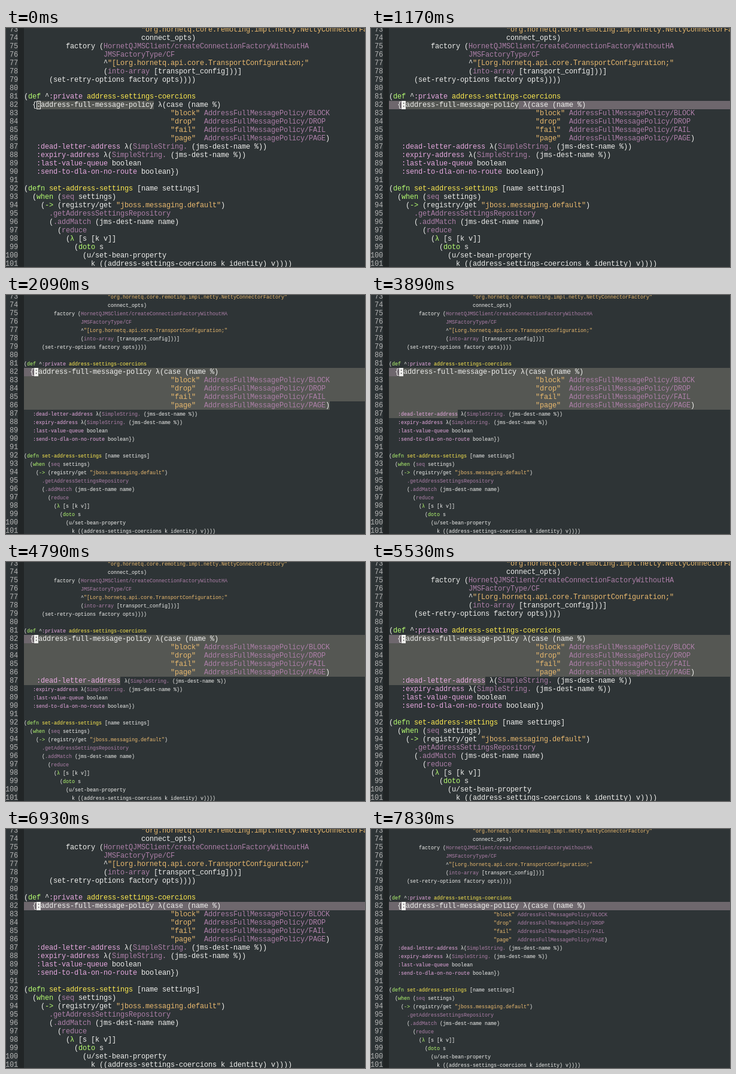
Recreate the animation shown at these times as an HTML page. Size 600 px wide and 400 px high, loop 8000 ms.

```html
<!DOCTYPE html>
<html lang="en">
<head>
<meta charset="utf-8">
<title>Expanding selection in a code editor</title>
<style>
html, body { margin: 0; width: 100%; height: 100%; overflow: hidden; background: #2e3436; }
#stage {
  position: relative; width: 600px; height: 400px; overflow: hidden;
  background: #2e3436; color: #eeeeec;
  font: 12px/14px "Liberation Mono", "Courier New", monospace;
  font-variant-ligatures: none;
}
#stage div { position: absolute; height: 14px; white-space: pre; }
#stage .fringe { left: 20px; top: 0; width: 10px; height: 400px; background: #212526; }
.num { right: 580px; color: #b3b3b3; }
.code { left: 30px; }
.num, .big, .cursor { letter-spacing: calc(7px - 1ch); }
.small { font-size: 8.5px; line-height: 0; letter-spacing: calc(5px - 1ch); }
.line { background: #6e676d; }
.region { background: #555753; }
.cursor { width: 7px; background: #eeeeec; }
#stage .hollow { box-sizing: border-box; background: none; border: 1px solid #eeeeec; }
.str { color: #e9b96e; }
.key { color: #e6a8df; }
.kw { color: #b4fa70; }
.fn { color: #fce94f; }
.sym { color: #ad7fa8; }
</style>
</head>
<body>
<div id="stage"></div>
<script>
const FIRST = 73, LEFT = 30, RIGHT = 600, LOOP = 8000;

// [indent, text] for each line
const lines = [
  [28, '"org.hornetq.core.remoting.impl.netty.NettyConnectorFactory"'],
  [28, 'connect_opts)'],
  [10, 'factory (HornetQJMSClient/createConnectionFactoryWithoutHA'],
  [19, 'JMSFactoryType/CF'],
  [19, '^"[Lorg.hornetq.api.core.TransportConfiguration;"'],
  [19, '(into-array [transport_config]))]'],
  [6, '(set-retry-options factory opts))))'],
  [0, ''],
  [0, '(def ^:private address-settings-coercions'],
  [2, '{:address-full-message-policy λ(case (name %)'],
  [35, '"block" AddressFullMessagePolicy/BLOCK'],
  [35, '"drop"  AddressFullMessagePolicy/DROP'],
  [35, '"fail"  AddressFullMessagePolicy/FAIL'],
  [35, '"page"  AddressFullMessagePolicy/PAGE)'],
  [3, ':dead-letter-address λ(SimpleString. (jms-dest-name %))'],
  [3, ':expiry-address λ(SimpleString. (jms-dest-name %))'],
  [3, ':last-value-queue boolean'],
  [3, ':send-to-dla-on-no-route boolean})'],
  [0, ''],
  [0, '(defn set-address-settings [name settings]'],
  [2, '(when (seq settings)'],
  [4, '(-> (registry/get "jboss.messaging.default")'],
  [6, '.getAddressSettingsRepository'],
  [6, '(.addMatch (jms-dest-name name)'],
  [8, '(reduce'],
  [10, '(λ [s [k v]]'],
  [12, '(doto s'],
  [14, '(u/set-bean-property'],
  [16, 'k ((address-settings-coercions k identity) v))))']
].map(([indent, text]) => ' '.repeat(indent) + text);

const syntax = new RegExp([
  '(?<str>"[^"]*")',
  '(?<key>:[a-z-]+)',
  '(?<fn>(?<=private |defn )[a-z-]+)',
  '(?<kw>\\b(?:defn?|when|doto)\\b|->|(?<=\\()λ(?= ))',
  '(?<sym>(?:HornetQJMSClient|JMSFactoryType|AddressFullMessagePolicy)/\\w+' +
    '|SimpleString\\.|\\.\\w+|into-array|\\bseq\\b|\\breduce\\b)'
].join('|'), 'g');

const escape = s => s.replace(/&/g, '&amp;').replace(/</g, '&lt;').replace(/>/g, '&gt;');

function paint(text) {
  let out = '', pos = 0;
  for (const m of text.matchAll(syntax)) {
    const kind = Object.keys(m.groups).find(k => m.groups[k]);
    out += escape(text.slice(pos, m.index)) + `<span class="${kind}">${escape(m[0])}</span>`;
    pos = m.index + m[0].length;
  }
  return out + escape(text.slice(pos));
}

// Lines whose two parts can differ in size
const splits = { 82: 2, 87: 24 };

// Which parts stay large, by zoom mode
const isBig = {
  all: () => true,
  line: n => n === 82,
  block: (n, part) => (n === 82 && part === 1) || (n > 82 && n < 87),
  grown: (n, part) => isBig.block(n, part) || (n === 87 && part === 0)
};

// Start time, zoom, region, line highlight, hollow cursor
const states = [
  [0, 'all', 'word', false, true],
  [520, 'all', '', true],
  [1170, 'all', 'word', true],
  [1360, 'all', 'block', true],
  [2090, 'block', 'block', true],
  [3890, 'block', 'grown', true],
  [4790, 'grown', 'grown', true],
  [5530, 'all', 'grown', true],
  [6790, 'all', 'word', false],
  [6930, 'all', '', true],
  [7830, 'line', '', true]
];

const top_ = n => 122 + (n - 82) * 14;

const bar = (kind, n, x0, x1) =>
  `<div class="${kind}" style="left:${x0}px;top:${top_(n)}px;width:${x1 - x0}px"></div>`;

function codeLine(text, n, zoom) {
  const at = splits[n] || 0;
  const parts = [text.slice(0, at), text.slice(at)].map((s, i) => {
    const size = isBig[zoom](n, i) ? 'big' : 'small';
    return s && `<span class="${size}">${n === 82 ? escape(s) : paint(s)}</span>`;
  });
  const y = `style="top:${top_(n)}px"`;
  return `<div class="num" ${y}>${n}</div><div class="code" ${y}>${parts.join('')}</div>`;
}

function selection(zoom, region, x) {
  if (!region) return '';
  if (region === 'word') return bar('region', 82, x, x + 28 * 7);
  const grown = region === 'grown';
  let out = bar('region', 82, x, RIGHT);
  for (let n = 83; n < 86; n++) out += bar('region', n, LEFT, RIGHT);
  out += bar('region', 86, LEFT, grown ? RIGHT : 541);
  const step = isBig[zoom](87, 0) ? 7 : 5;
  return grown ? out + bar('region', 87, LEFT, LEFT + 23 * step) : out;
}

function render([, zoom, region, lit, hollow]) {
  const x = isBig[zoom](82, 0) ? 51 : 47;
  const ink = region ? '#555753' : '#6e676d';
  return '<div class="fringe"></div>' +
    (lit ? bar('line', 82, LEFT, RIGHT) : '') +
    selection(zoom, region, x) +
    lines.map((text, i) => codeLine(text, FIRST + i, zoom)).join('') +
    `<div class="cursor${hollow ? ' hollow' : ''}" style="left:${x}px;top:${top_(82)}px;color:${ink}">` +
    (hollow ? '' : ':') + '</div>';
}

const stage = document.getElementById('stage');
const start = performance.now();
let shown = null;

function tick() {
  const t = (performance.now() - start) % LOOP;
  const state = states.findLast(s => s[0] <= t);
  if (state !== shown) {
    stage.innerHTML = render(state);
    shown = state;
  }
  requestAnimationFrame(tick);
}
tick();
</script>
</body>
</html>
```
